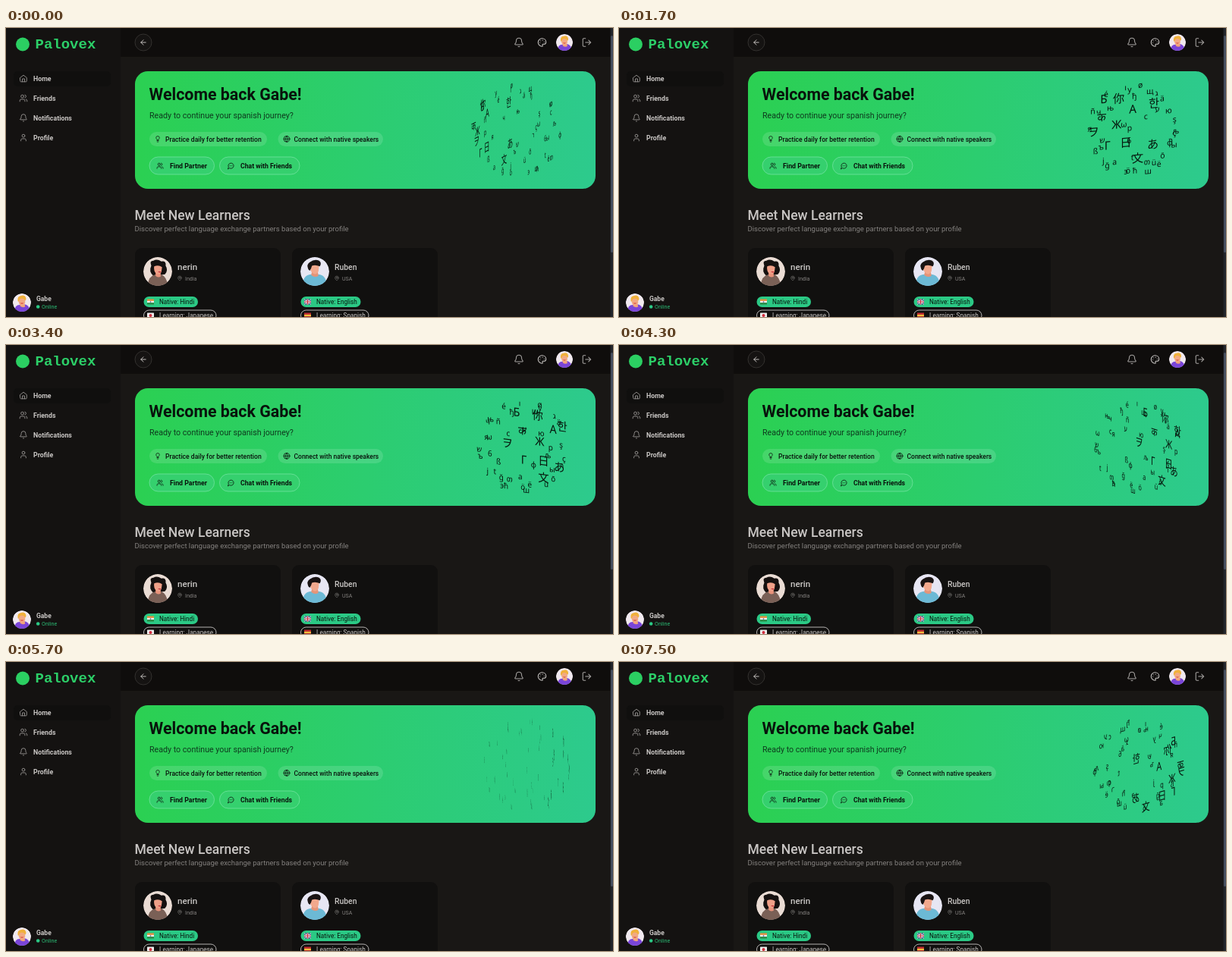
Animation, 800 px wide and 381 px high, one loop 7600 ms. Source, as an HTML page with a canvas:

```html
<!DOCTYPE html>
<html lang="en">
<head>
<meta charset="utf-8">
<style>
  html, body { margin: 0; width: 100%; height: 100%; overflow: hidden; background: #191715; }
  svg, canvas { position: absolute; left: 0; top: 0; display: block; }
  text { font-family: Roboto, "Open Sans", sans-serif; fill: #c9c6c4; }
  .b { font-weight: 700; }
  .m { font-weight: 500; }
  .ink { fill: #08130c; }
  .dim { fill: #84817f; }
  .icon { fill: none; stroke-linecap: round; stroke-linejoin: round; }
</style>
</head>
<body>
<svg id="page" width="800" height="381" viewBox="0 0 800 381"></svg>
<canvas id="globe" width="800" height="381"></canvas>
<script>
const ICONS = {
  house: 'M9 21v-8h6v8M3 10l9-7 9 7v9a2 2 0 0 1-2 2H5a2 2 0 0 1-2-2z',
  users: 'M16 21v-2a4 4 0 0 0-4-4H6a4 4 0 0 0-4 4v2M13 7a4 4 0 1 1-8 0 4 4 0 0 1 8 0M22 21v-2a4 4 0 0 0-3-3.9M16 3.1a4 4 0 0 1 0 7.8',
  bell: 'M10.3 21a2 2 0 0 0 3.4 0M3.3 15.3A1 1 0 0 0 4 17h16a1 1 0 0 0 .7-1.7C19.4 14 18 12.5 18 8A6 6 0 0 0 6 8c0 4.5-1.4 6-2.7 7.3z',
  user: 'M19 21v-2a4 4 0 0 0-4-4H9a4 4 0 0 0-4 4v2M16 7a4 4 0 1 1-8 0 4 4 0 0 1 8 0',
  back: 'M12 19l-7-7 7-7M19 12H5',
  palette: 'M12 2a10 10 0 0 0 0 20 1.7 1.7 0 0 0 1.3-2.8 1.7 1.7 0 0 1 1.2-2.8H17a5 5 0 0 0 5-5C22 6 17.5 2 12 2zM13.5 6.5h.1M17.5 10.5h.1M8.5 7.5h.1M6.5 12.5h.1',
  exit: 'M16 17l5-5-5-5M21 12H9M9 21H5a2 2 0 0 1-2-2V5a2 2 0 0 1 2-2h4',
  bulb: 'M15 14c.2-1 .7-1.7 1.5-2.5A5.5 5.5 0 0 0 18 8 6 6 0 0 0 6 8c0 1 .2 2.2 1.5 3.5.7.7 1.3 1.5 1.5 2.5zM9 18h6M10 22h4',
  world: 'M22 12a10 10 0 1 1-20 0 10 10 0 0 1 20 0M12 2a15 15 0 0 0 0 20 15 15 0 0 0 0-20M2 12h20',
  chat: 'M7.9 20A9 9 0 1 0 4 16.1L2 22zM8 12h.1M12 12h.1M16 12h.1',
  pin: 'M20 10c0 5-5.5 10.2-8 12-2.5-1.8-8-7-8-12a8 8 0 0 1 16 0M15 10a3 3 0 1 1-6 0 3 3 0 0 1 6 0'
};

const rect = (x, y, w, h, r, fill, extra = '') =>
  `<rect x="${x}" y="${y}" width="${w}" height="${h}" rx="${r}" fill="${fill}" ${extra}/>`;
const circle = (x, y, r, fill, extra = '') =>
  `<circle cx="${x}" cy="${y}" r="${r}" fill="${fill}" ${extra}/>`;
const text = (x, y, size, str, cls = '', extra = '') =>
  `<text x="${x}" y="${y}" font-size="${size}" class="${cls}" ${extra}>${str}</text>`;
// Icons are centred on x, y
const icon = (name, x, y, size, color = '#a8a5a3', weight = 2) =>
  `<path class="icon" d="${ICONS[name]}" stroke="${color}" stroke-width="${weight}"
    transform="translate(${x - size / 2} ${y - size / 2}) scale(${size / 24})"/>`;

const shape = (d, fill) => `<path d="${d}" fill="${fill}"/>`;
const PEOPLE = {
  purple: circle(0, 0, 20, '#f1e9ef') +
    shape('M-17 20Q-16 5-5 5L8 4Q17 7 18 20z', '#7a45d8') +
    shape('M-4 3H6L7 9Q2 12-4 8z', '#f0a27a') +
    shape('M-7-8Q0-14 7-8V1Q4 7 0 7-6 6-7-1z', '#f2a983') +
    shape('M-9-3Q-11-14-2-15 6-18 9-10 10-5 7-4 5-9-1-9-6-8-7-2z', '#f0b13c') +
    shape('M-4 1Q0 5 4 1z', '#d8443f'),
  brown: circle(0, 0, 20, '#eadcd4') +
    shape('M-9-8Q-12-15-6-15-1-18 5-14 12-15 11-8 15-2 10 4L-6 6Q-13 0-9-8z', '#15100f') +
    shape('M-14 20Q-13 6-3 4L5 4Q13 8 14 20z', '#7a6056') +
    shape('M-3 1H4V7Q0 9-3 6z', '#e8927a') +
    shape('M-5-7Q1-10 6-6L5 1Q2 5-2 3-6 0-5-7z', '#f0a088') +
    shape('M0 0Q3 3 5 0z', '#c52f3a'),
  blue: circle(0, 0, 20, '#e7e6f3') +
    shape('M-17 20Q-17 5-5 4L5 4Q16 5 17 20z', '#6cb9d5') +
    shape('M-4 0H4L5 6Q0 9-5 5z', '#e59478') +
    shape('M-7-9Q0-13 6-8L5 0Q2 5-2 3-7 0-7-9z', '#f2a88d') +
    shape('M-9-3Q-12-10-7-13 0-18 6-15 10-12 7-7 1-10-4-8-5-4-7-1z', '#191313')
};
const avatar = (kind, x, y, r) =>
  `<g transform="translate(${x} ${y}) scale(${r / 20})" clip-path="url(#disc)">${PEOPLE[kind]}</g>`;

const stripes = (x, y, colors) => colors.map((c, i) => rect(x, y + i * 7 / 3, 9, 2.4, 0, c)).join('');
const FLAGS = {
  india: (x, y) => stripes(x, y, ['#ef8b3a', '#eee', '#2c8a45']) + circle(x + 4.5, y + 3.5, .8, '#354a96'),
  spain: (x, y) => stripes(x, y, ['#c62b32', '#f2bd3c', '#c62b32']),
  japan: (x, y) => rect(x, y, 9, 7, .5, '#eee') + circle(x + 4.5, y + 3.5, 2, '#d12c3c'),
  uk: (x, y) => rect(x, y, 9, 7, .5, '#35437f') +
    `<path d="M${x} ${y}l9 7m0-7l-9 7" stroke="#ddd"/>` +
    `<path d="M${x + 4.5} ${y}v7m-4.5-3.5h9" stroke="#eee" stroke-width="2.4"/>` +
    `<path d="M${x + 4.5} ${y}v7m-4.5-3.5h9" stroke="#cc3142" stroke-width="1.2"/>`
};

function card(x, who, name, size, place, native, nativeFlag, nativeWidth, goal, goalFlag, goalWidth) {
  return rect(x, 290, 192, 110, 9, '#11100f') +
    avatar(who, x + 30, 321, 19) +
    text(x + 56, 319, size, name, 'm') +
    icon('pin', x + 59, 330, 7, '#84817f') +
    text(x + 66, 333, 7.1, place, 'dim') +
    rect(x + 11.5, 354, nativeWidth, 14, 7, '#2bc985') +
    FLAGS[nativeFlag](x + 16, 357.5) + text(x + 32, 364, 8.2, 'Native: ' + native, 'ink') +
    rect(x + 11.5, 372, goalWidth, 14, 7, 'none', 'stroke="#c9c6c4" stroke-width=".9"') +
    FLAGS[goalFlag](x + 16, 375.5) + text(x + 32, 382, 8.2, 'Learning: ' + goal);
}

const menu = [['house', 'Home'], ['users', 'Friends'], ['bell', 'Notifications'], ['user', 'Profile']];
const outline = 'stroke="#70e29f" stroke-width=".8"';

document.getElementById('page').innerHTML = `<defs>
  <linearGradient id="hero"><stop stop-color="#2bd052"/><stop offset="1" stop-color="#2dca8d"/></linearGradient>
  <clipPath id="disc"><circle r="20"/></clipPath></defs>` +
  rect(0, 0, 800, 381, 0, '#191715') +
  rect(0, 0, 151, 381, 0, '#141211') +
  rect(151, 0, 646, 38, 0, '#0f0d0c') +
  rect(796.5, 0, 3.5, 381, 0, '#22252b') +
  rect(797, 10, 3, 286, 1.5, '#454e5e') +

  circle(22, 21.5, 9, '#2bcf62') +
  text(38.5, 27, 19, 'Palovex', 'b', 'style="font-family:\'Liberation Mono\',monospace;fill:#2ccf68"') +
  rect(10, 57, 128, 20, 5, '#100f0e') +
  menu.map(([name, label], i) =>
    icon(name, 23, 66.5 + 26 * i, 11.5, '#918e8c') + text(36, 69.8 + 26 * i, 8.8, label, 'b')).join('') +
  avatar('purple', 21, 362, 12) +
  text(40, 360, 8.5, 'Gabe', 'b') +
  circle(42.2, 367.5, 2.3, '#2bc985') +
  text(47, 370, 7.2, 'Online', '', 'style="fill:#2bb873"') +

  circle(181, 19, 11, '#151312', 'stroke="#3c3937" stroke-width=".8"') +
  icon('back', 181, 19, 11, '#d0cdca') +
  icon('bell', 676, 19, 14, '#a8a5a3', 1.8) +
  icon('palette', 706.5, 19, 12.5, '#c9c6c4') +
  avatar('purple', 736, 19, 11) +
  icon('exit', 765.5, 19, 14, '#a8a5a3', 1.8) +

  rect(170, 57, 607, 155, 17, 'url(#hero)') +
  text(188.5, 95, 21.4, 'Welcome back Gabe!', 'b ink') +
  text(189, 118.5, 10.65, 'Ready to continue your spanish journey?', '', 'style="fill:#0e3a1e"') +
  rect(189, 137, 155, 19, 9.5, '#fff', 'fill-opacity=".13"') +
  icon('bulb', 200, 146.3, 9, '#08130c') +
  text(210, 149.5, 8.6, 'Practice daily for better retention', 'm ink') +
  rect(358.5, 137, 138.5, 19, 9.5, '#fff', 'fill-opacity=".13"') +
  icon('world', 370, 146.3, 9.5, '#08130c') +
  text(379.5, 149.5, 8.5, 'Connect with native speakers', 'm ink') +
  rect(189, 170, 85.5, 23, 11.5, '#35d06e', outline) +
  icon('users', 203, 181.7, 9.5, '#08130c') +
  text(216, 185, 8.8, 'Find Partner', 'b ink') +
  rect(281.5, 170, 105.5, 23, 11.5, '#35d06e', outline) +
  icon('chat', 296.5, 181.7, 9.5, '#08130c') +
  text(309, 185, 8.7, 'Chat with Friends', 'b ink') +

  text(169.5, 253, 17.5, 'Meet New Learners', 'm') +
  text(169.5, 267.7, 9.53, 'Discover perfect language exchange partners based on your profile', 'dim') +
  card(170, 'brown', 'nerin', 11.6, 'India', 'Hindi', 'india', 71.5, 'Japanese', 'japan', 95.5) +
  card(377, 'blue', 'Ruben', 10.4, 'USA', 'English', 'uk', 79, 'Spanish', 'spain', 89.5);

// Globe letters with their screen positions when turn is zero
const BIG = `你 681 93,Б 655 91,한 723 104,А 702 109,क 658 115,Ж 681 127,ヲ 641 133,Г 663 153,
  日 690 152,あ 720 158,文 698 174`;
const FRONT = `é 647 84,ø 697 77,у 690 82,ñ 634 105,я 623 127,ß 636 158,a 665 175,ğ 646 178,ü 711 181,
  ö 676 188,ä 726 98,ç 738 145,ō 722 173,ר 734 154,р 698 133`;
const BEHIND = `щ 700 86,ђ 672 90,ı 672 78,ю 717 114,c 677 118,ω 648 125,њ 640 102,ч 630 106,ע 697 110,
  ş 736 127,љ 727 142,6 652 147,ы 729 160,ф 712 156,თ 679 178,t 658 170,j 633 171,э 659 188,
  ш 692 191,ë 702 183,ћ 668 188,ש 626 143,ъ 626 152,ג 719 90`;

const CX = 679.5, CY = 136.4, R = 58, SHIFT = 6, TILT = 0.27;
const SPEED = 26 * Math.PI / 180, TURN_ZERO = 2.6, YAW_ZERO = 2.4;
const S = Math.sin(TILT), C = Math.cos(TILT);

const parse = (list, side, size) => list.split(',').map(item => {
  const [glyph, px, py] = item.trim().split(' ');
  const x = px - CX, y = py - CY + SHIFT * S;
  const z = side * Math.sqrt(Math.max(0, R * R - x * x - y * y));
  return { glyph, size, x, y: y * C + z * S, z: z * C - y * S + SHIFT };
});
const letters = [...parse(BIG, 1, 16), ...parse(FRONT, 1, 11), ...parse(BEHIND, -1, 11)];

const ctx = document.getElementById('globe').getContext('2d');
ctx.textAlign = 'center';
ctx.textBaseline = 'middle';
ctx.fillStyle = '#06170d';

function draw(t) {
  ctx.setTransform(1, 0, 0, 1, 0, 0);
  ctx.clearRect(0, 0, 800, 381);
  const turn = SPEED * (t - TURN_ZERO), yaw = SPEED * (t - YAW_ZERO);
  const s = Math.sin(turn), c = Math.cos(turn);
  for (const p of letters) {
    const x = p.x * c + p.z * s, z = p.z * c - p.x * s;
    ctx.setTransform(Math.cos(yaw), Math.sin(yaw) * S, 0, C, CX + x, CY + p.y * C - z * S);
    ctx.font = `500 ${p.size}px "Noto Sans", "Noto Sans CJK JP", "Noto Sans CJK KR", "DejaVu Sans", sans-serif`;
    ctx.fillText(p.glyph, 0, 0);
  }
}

const start = performance.now();
function tick() {
  const ms = (performance.now() - start) % 7600;
  draw(Math.floor(ms / 100) / 10);
  requestAnimationFrame(tick);
}
tick();
</script>
</body>
</html>
```
